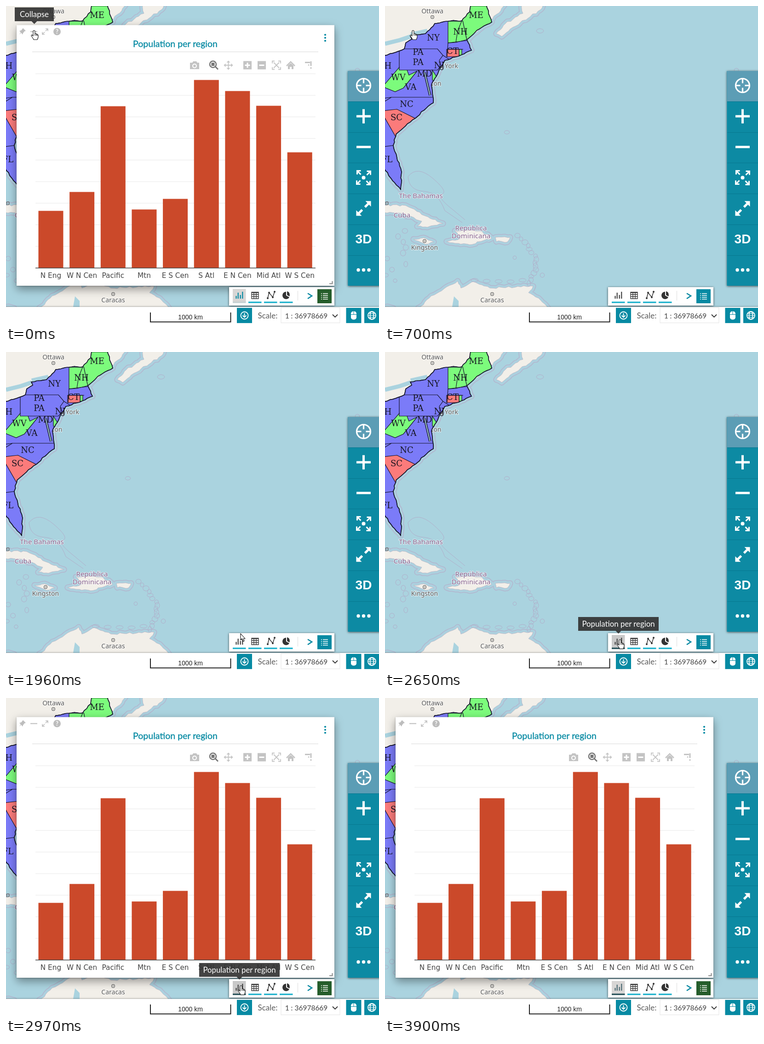
Animation of 811 by 690 pixels, one loop 4130 ms. Source, as an HTML page:

```html
<!DOCTYPE html>
<html lang="en">
<head>
<meta charset="utf-8">
<title>Collapsible chart widget</title>
<style>
html, body { margin: 0; width: 100%; height: 100%; overflow: hidden; background: #aad3df; }
svg { display: block; width: 811px; height: 690px; }
text { font-family: Lato, sans-serif; text-anchor: middle; }
.line { fill: none; }
#codes text { font: 18px "DejaVu Serif", serif; fill: #151520; }
#places text { font: 14px "Noto Sans", sans-serif; fill: #555; paint-order: stroke; stroke: #fffb; stroke-width: 2px; }
#places .area { font-size: 15px; fill: #86608b; }
#axis text { font: 15.3px "DejaVu Sans", sans-serif; fill: #444; }
.plain { font: 14px "Liberation Sans", sans-serif; }
.big { font: bold 28px "Liberation Sans", sans-serif; }
</style>
</head>
<body>
<svg viewBox="0 0 811 690" xmlns="http://www.w3.org/2000/svg">
  <defs>
    <filter id="deep" x="-20%" y="-20%" width="140%" height="140%">
      <feDropShadow dx="0" dy="7" stdDeviation="10" flood-opacity=".32"/>
      <feDropShadow dx="0" dy="1" stdDeviation="1.5" flood-opacity=".3"/>
    </filter>
    <filter id="soft" x="-20%" y="-30%" width="140%" height="160%">
      <feDropShadow dx="0" dy="1" stdDeviation="2.5" flood-opacity=".65"/>
    </filter>
    <path id="land"/>
    <path id="coast"/>
    <clipPath id="inside"><use href="#coast"/></clipPath>
  </defs>

  <g id="map" stroke-linejoin="round">
    <rect width="811" height="690" fill="#aad3df"/>
    <g class="line" stroke="#b2b5cd" stroke-width="13"><use href="#land"/><use href="#coast"/></g>
    <g class="line" stroke="#acd1df" stroke-width="10"><use href="#land"/><use href="#coast"/></g>
    <use href="#land" fill="#f2efe9" stroke="#b9b5c4" stroke-width=".8"/>
    <path d="M0 82 32 74 56 66M56 62 92 54" stroke="#aad3df" stroke-width="9"/>
    <path d="M146 653 150 630 160 640V653" fill="#aad3df"/>
    <g class="line" stroke="#b0b0cb"><path id="isles"/><path d="M50 370Q70 345 104 374T124 408 150 444L174 464M50 370Q52 400 84 402T130 444L168 470"/></g>
  </g>
  <g id="places"></g>
  <g stroke="#14142a" stroke-width="1.2">
    <use href="#coast" fill="#7b7bf8"/>
    <g clip-path="url(#inside)">
      <path d="M137 33H167L180 0H240V60L178 73 154 79 137 80ZM-5 175 31 133V139H48L52 150 70 141 40 178 22 186ZM103 139 118 163 103 161ZM161 94H167V107H161Z" fill="#7cfb7c"/>
      <path d="M-9 228 26 224 42 232 70 246 24 285ZM134 94H161V110H134Z" fill="#fb7b7b"/>
      <path d="M167 32 158 54 154 79M169 32 178 74M137 80 135 110M31 133V93H114L126 107 118 118 122 130 114 139H48M126 107 140 116M137 80 185 74M135 94H170M-9 201 14 198H110M14 198-9 212M-9 306 30 301" class="line"/>
      <path d="M86 144 98 194" stroke-width="5"/><path d="M86 144 98 194" stroke="#aad3df" stroke-width="2"/>
    </g>
    <use href="#coast" class="line" stroke-width="1.7"/>
  </g>
  <g id="codes"></g>

  <g id="dialog">
    <rect x="23" y="41.5" width="691" height="565.5" fill="#fff" filter="url(#deep)"/>
    <g id="content">
      <rect id="focus" x="49" y="43" width="21" height="21" fill="#000" opacity=".12"/>
      <g id="header"></g>
      <text x="368" y="89" font-size="19.5" fill="#078aa3" stroke="#078aa3" stroke-width=".35">Population per region</text>
      <path d="M57 99.500H679" stroke="#d9d9d9"/>
      <path d="M703 602.500H709.500V597" class="line" stroke="#8a8a8a" stroke-width="2"/>
      <g id="chart">
        <g id="grid" stroke="#e8e8e8"></g>
        <g id="bars" fill="#cb492a"></g>
        <path d="M64 568.500H673" stroke="#444" stroke-width="1.5"/>
        <g id="axis"></g>
        <g id="modebar" fill="#c4c4c4"></g>
      </g>
      <g id="spinner" class="line" stroke-width="16">
        <circle cx="368" cy="360" r="189.5" stroke="#cde7eb"/>
        <circle id="arc" cx="368" cy="360" r="189.5" stroke="#078aa3" pathLength="4" stroke-dasharray="1 3"/>
      </g>
    </g>
  </g>

  <rect x="743.5" y="141" width="80" height="466" fill="#078aa3" filter="url(#soft)"/>
  <rect x="743.5" y="141" width="68" height="66" fill="#5c9db5"/>
  <g id="tools" fill="#fff"></g>

  <rect x="485" y="610" width="229" height="40" fill="#fff" filter="url(#soft)"/>
  <rect id="hot" x="493" y="614" width="28.5" height="29"/>
  <rect id="list" x="677" y="614.5" width="31" height="30.5"/>
  <g id="widgets" fill="#333"></g>

  <rect x="-20" y="653" width="851" height="60" fill="#fff" filter="url(#soft)"/>
  <path d="M314 665V685.500H488.500V665" class="line" stroke="#222" stroke-width="2"/>
  <text x="401" y="680" class="plain" fill="#222">1000 km</text>
  <g id="footer"></g>
  <text x="569" y="678" font-size="17" fill="#5c5c5c">Scale:</text>
  <rect x="598" y="654.5" width="128" height="33" fill="none" stroke="#e3e3e3"/>
  <text x="653" y="678" font-size="15.5" fill="#444">1 : 36978669</text>

  <g id="tipCollapse"></g>
  <g id="tipChart"></g>
  <g stroke="#111" fill="#fff" stroke-width="1.1" stroke-linejoin="round">
    <path id="hand" d="M-2 12V2Q-2 0 0 0T2 2V11 7Q4 6 5 8V11 8Q7 7 7 9V11 9Q9 9 9 11V14Q9 16 7 20H-1Q-2 17-6 12-6 9-4 10Z"/>
    <path id="arrow" d="M0 0V14L3 11 6 17 8 16 6 11H10Z"/>
  </g>
</svg>
<script>
const $ = id => document.getElementById(id);
const show = (id, on) => $(id).style.display = on ? '' : 'none';
const fill = (id, ...parts) => $(id).innerHTML = parts.flat().join('');
const LOOP = 4130, TEAL = '#078aa3';

// Drawing helpers; icons are drawn around their own centre
const range = n => [...Array(n).keys()];
const at = (x, y, ...inner) => `<g transform="translate(${x} ${y})">${inner.join('')}</g>`;
const line = (d, w, c = '#fff') => `<path d="${d}" fill="none" stroke="${c}" stroke-width="${w}"/>`;
const dot = (x, y, r) => `<circle cx="${x}" cy="${y}" r="${r}"/>`;
const ring = (r, w, c = '#fff') => `<circle r="${r}" fill="none" stroke="${c}" stroke-width="${w}"/>`;
const box = (s, c) => `<rect x="${-s / 2}" y="${-s / 2}" width="${s}" height="${s}" fill="${c}"/>`;
const label = (s, x, y, more = '') => `<text x="${x}" y="${y}" ${more}>${s}</text>`;
const plus = (r, w, c) => line(`M${-r} 0H${r}M0 ${-r}V${r}`, w, c);
const minus = (r, w, c) => line(`M${-r} 0H${r}`, w, c);
const turned = (angles, s) => angles.map(a => `<g transform="rotate(${a})">${s}</g>`).join('');
const quarters = [0, 90, 180, 270];

// Map
let seed = 7;
const rnd = () => (seed = seed * 16807 % 2147483647) / 2147483647;

// Closed outline through key points, broken up like a coastline
function rough(str, amp = 3.4) {
  const pts = str.split(' ').map(p => p.split(',').map(Number));
  return 'M' + pts.map((p, i) => {
    const q = pts[(i + 1) % pts.length];
    const k = Math.ceil(Math.hypot(q[0] - p[0], q[1] - p[1]) / 7);
    return range(k).map(j => [0, 1].map(c =>
      (p[c] + (q[c] - p[c]) * j / k + (j && rnd() - .5) * amp).toFixed(1)));
  }).join('L') + 'Z';
}
const blob = (x, y, rx, ry) => rough(range(8).map(k =>
  [x + rx * Math.cos(k * Math.PI / 4), y + ry * Math.sin(k * Math.PI / 4)].join()).join(' '), 1);

$('land').setAttribute('d', [
  '-30,-20 275,-20 234,28 205,51 178,73 130,118 -30,118',
  '242,60 262,38 300,16 290,-20 350,-20 338,8 272,50 254,66',
  '-20,432 45,433 86,455 126,472 92,480 70,478 80,467 36,450 -20,448',
  '134,511 164,504 152,488 208,488 232,504 184,518',
  '240,502 272,502 266,512 242,511',
  '62,506 84,503 106,512 88,517',
  '60,670 96,634 158,597 165,612 192,598 228,612 322,608 312,622 334,634 370,670',
  '-20,650 18,656 20,670',
].map(s => rough(s)).join(''));
$('coast').setAttribute('d', rough('-9,110 42,93 45,80 58,72 55,65 88,60 108,38 137,33 167,32 184,13 188,-9 219,-9 232,35 '
  + '205,50 178,73 188,96 166,106 130,118 112,152 101,172 105,210 60,247 24,278 18,302 36,360 34,398 8,368 -9,340', 2.4));

const small = () => 4 + rnd() * 3;
$('isles').setAttribute('d', [
  blob(337, 54, 8, 5), blob(265, 274, 6, 4), blob(764, 139, 5, 4), blob(282, 546, 4, 4), blob(342, 584, 5, 5),
  range(15).map(i => blob(288 + 36 * Math.sin(i * .18) + rnd() * 8, 498 + i * 7.4, small(), small())),
  range(10).map(i => blob(rnd() * 48, 488 + i * 12, small(), small())),
  range(5).map(i => blob(195 + i * 26, 594 + rnd() * 5, 8, 4)),
].flat().join(''));

const town = (s, x, y, gap) => at(x, y, ring(3.4, 1.2, '#666'), ring(.6, 1, '#666'), label(s, 0, gap));
const area = (s, x, y) => label(s, x, y, 'class="area"');
fill('places', town('Ottawa', 103, 24, -8), town('Kingston', 86, 510, 19), town('Caracas', 233, 625, 18), town('', 4, 428, 0),
  label('New York', 128, 135), label('Washington', 83, 173),
  area('The Bahamas', 78, 417), area('Cuba', 37, 459), area('República', 187, 487), area('Dominicana', 187, 504));
fill('codes', 'ME 198 26,NH 164 62,NY 105 75,PA 72 106,PA 72 128,NJ 118 135,CT 147 104,MD 86 153,WV 29 161,VA 56 182,NC 47 219,SC 25 248,OH -1 136,FL 4 339'
  .split(',').map(s => label(...s.split(' '))));

// Dialog
const pale = '#bdbdbd', grey = '#c4c4c4';
const corner = line('M1 -1 6 -6M1 -6H6V-1', 1.6, pale);
fill('header',
  at(36, 55, `<path d="M1-7 7-1 4 0 1 4 0 7-3 3-7 7-4 2-7-1-3-2Z" fill="${pale}"/>`),
  at(60.5, 55.5, minus(7.5, 2, pale)),
  at(85, 55.5, turned([0, 180], corner)),
  at(111, 55.5, ring(4, 8, pale), label('?', 0, 4.5, 'font-size="13" font-weight="700" fill="#fff"')),
  at(694, 69, `<g fill="${TEAL}">`, [-6.5, 0, 6.5].map(y => dot(0, y, 2.1)).join(''), '</g>'));

const values = { 'N Eng': 124, 'W N Cen': 165, 'Pacific': 351, 'Mtn': 127, 'E S Cen': 150, 'S Atl': 408, 'E N Cen': 384, 'Mid Atl': 352, 'W S Cen': 251 };
const mid = i => 97.5 + 67.65 * i;
fill('bars', Object.values(values).map((h, i) => `<rect x="${mid(i) - 27}" y="${568.5 - h}" width="54" height="${h}"/>`));
fill('axis', Object.keys(values).map((s, i) => label(s, mid(i), 590)));
fill('grid', range(9).map(i => `<path d="M64 ${147 + 46.8 * i}H673"/>`));

fill('modebar',
  at(410, 129, '<path d="M-10-6H-5L-3-9H4L6-6H10V8H-10Z"/>', `<g transform="translate(0 1)">${ring(4, 2)}</g>`),
  at(450, 126.5, ring(7, 2.6, '#777'), box(7, '#777'), line('M5 5 11 11', 2.8, '#777')),
  at(483.5, 128.5, plus(8, 1.8, grey), turned(quarters, '<path d="M0-10 4-6H-4Z"/>')),
  at(525, 128.5, box(18, grey), plus(5.5, 3)),
  at(556, 128.5, box(18, grey), minus(5.5, 3)),
  at(588, 128.5, turned(quarters, line('M4-9H9V-4M0 0 6-6', 1.8, grey))),
  at(619, 129, line('M-9 1 0-8 9 1', 2.6, grey), '<path d="M-6 0 0-5 6 0V8H2V3H-2V8H-6Z"/>'),
  at(658, 128, line('M-8-5.500H3M5-8V2M5 5V8', 3, grey), dot(0, 0, 1.5)));

// Right toolbar: seven equal cells
const cell = (i, ...inner) => at(777.5, 172.5 + 66.7 * i, ...inner);
fill('tools',
  range(6).map(i => line(`M744 ${Math.round(207 + 66.7 * i) + .5}H811`, 1, '#067890')),
  cell(0, ring(15, 3.2), turned(quarters, line('M0-15V-5', 3.2))),
  cell(1, plus(15.5, 5)),
  cell(2, minus(15.5, 5)),
  cell(3, dot(0, 0, 4), turned(quarters, line('M7-14H15V-6M15-14 7-6', 3))),
  cell(4, turned([0, 180], line('M3-3 12-12', 5) + '<path d="M4-16H16V-4Z"/>')),
  cell(5, label('3D', 0, 9, 'class="big"')),
  cell(6, [-11.5, 0, 11.5].map(x => dot(x, 0, 3.7)).join('')));

// Widget tray: four charts, arrow, list
const knots = [[-7, 6], [-4, -6], [4, 4], [8, -8]];
fill('widgets',
  range(4).map(i => `<path id="under${i}" d="M${493 + 34 * i} 643h28.500" stroke="#10adc9" stroke-width="3"/>`),
  `<path id="glyph" d="M500.500 629V635M504.700 622V635M509.700 627V635M514.300 620V635" stroke-width="2.2"/>`,
  at(541.5, 628, line('M-7.500-7H7.500V7H-7.500ZM-7-6H7M-7-2H7M-7 2.500H7M-2.500-6V7M2.500-6V7', 1.3, '#333')),
  at(576, 628, line('M' + knots.join('L'), 1.5, '#333'), knots.map(p => dot(...p, 2)).join('')),
  at(609, 628, '<path d="M0 0V-8A8 8 0 1 0 7 4ZM2-1V-9Q8-8 8 0L7 2Z"/>'),
  line('M634.500 618V639', 1, '#ddd'),
  line('M656 623.500 665 629 656 635', 2.6, TEAL),
  at(692.5, 630, range(4).map(i => line(`M-7.500 ${4 * i - 6}h2m2 0h11`, 1.7)).join('')));

const button = (x, ...inner) => at(x, 671.5, box(33, TEAL), ...inner);
fill('footer',
  button(518.5, ring(8, 1.8), line('M0-5V3M-4 0 0 4 4 0', 1.8)),
  button(756, '<rect x="-6" y="-9" width="12" height="18" rx="5" fill="#fff"/>', line('M-6-2H6M0-9V-2', 1, TEAL)),
  button(795.5, ring(8.5, 1.8), '<ellipse rx="4" ry="8.5" fill="none" stroke="#fff" stroke-width="1.8"/>', line('M-8 0H8M-7-4H7M-7 4H7', 1.2)),
  line('M710 669.500 715.500 675 721 669.500', 1.8, '#333'));

const tip = (id, s, x, y, w, size) => fill(id, at(x, y,
  `<path d="M${-w / 2} 0H${w / 2}V30H6L0 36-6 30H${-w / 2}Z" fill="#333" opacity=".92"/>`,
  label(s, 0, 20.5, `font-size="${size}" fill="#fff"`)));
tip('tipCollapse', 'Collapse', 61.5, 3, 85, 17);
tip('tipChart', 'Population per region', 507.5, 575, 175, 16.8);

// Animation
const steps = (t, from, gap, n) => Math.max(0, Math.min(n, Math.floor((t - from) / gap) + 1));

function cursor(t) {
  if (t >= 3900) return [];
  if (t >= 3670) return ['arrow', 511, 625 + 5 * steps(t, 3670, 77, 3)];
  if (t >= 2280) return ['hand', 511, 624];
  if (t >= 1640) return ['arrow', 510, 607 + 2 * steps(t, 1890, 70, 2)];
  if (t < 1090) return ['hand', 61, 53];
  const u = steps(t, 1090, 80, 7) / 7, e = u * u * (3 - 2 * u);
  return ['arrow', 61 + 427 * e, 54 + 519 * e];
}

function draw(t) {
  const open = t < 700 || t >= 2740;
  const active = t < 550 || t >= 2740;
  const loading = t >= 2740 && t < 2970;
  const hover = t >= 2280 && t < 3670;

  show('dialog', open);
  show('content', active);
  show('focus', t >= 380 && t < 550);
  show('chart', !loading);
  show('spinner', loading);
  $('arc').setAttribute('transform', `rotate(${140.5 + 28 * steps(t, 2820, 75, 2)} 368 360)`);

  $('hot').setAttribute('fill', hover ? '#c9c9c9' : active ? '#d8d6d5' : '#fff');
  $('under0').setAttribute('stroke', t < 550 ? '#c3cfd1' : hover || active ? '#1d4a52' : '#10adc9');
  $('glyph').setAttribute('stroke', t < 550 ? TEAL : t >= 3670 ? '#4b6a73' : '#444');
  $('list').setAttribute('fill', open ? '#255d2b' : TEAL);

  show('tipCollapse', t < 700);
  $('tipChart').setAttribute('opacity', (steps(t, 2280, 70, 3) - steps(t, 3670, 77, 3)) / 3);

  const [kind, x, y] = cursor(t);
  for (const id of ['hand', 'arrow']) show(id, kind === id);
  if (kind) $(kind).setAttribute('transform', `translate(${x.toFixed(1)} ${y.toFixed(1)})`);
}

const start = performance.now();
function tick() {
  draw((performance.now() - start) % LOOP);
  requestAnimationFrame(tick);
}
tick();
</script>
</body>
</html>
```
